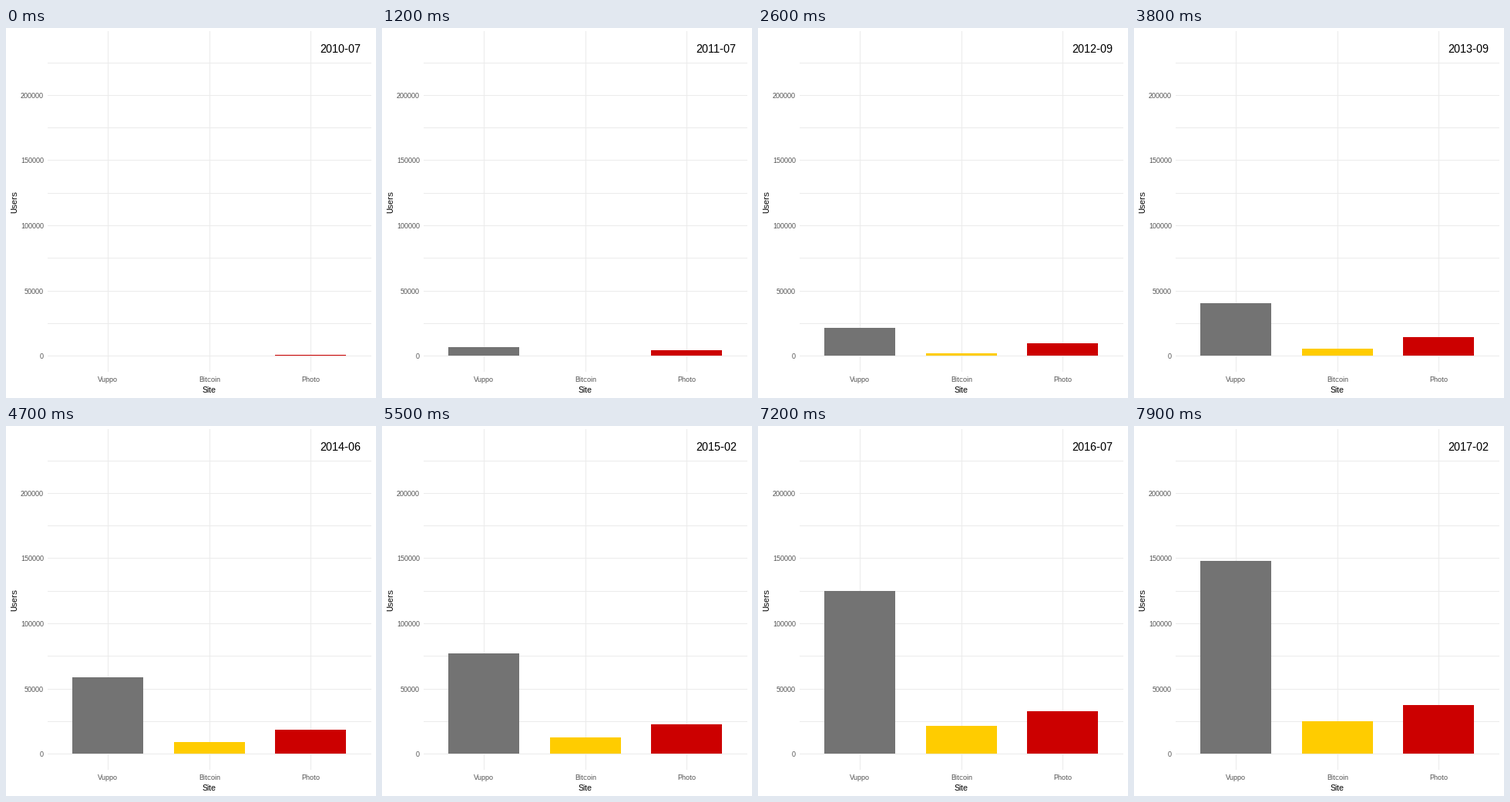
Write a matplotlib script that moves like this. It is 480 px wide and 480 px high and loops after 8 s.

```python
import matplotlib.pyplot as plt
from matplotlib.animation import FuncAnimation

SIZE, DPI = 480, 100
FRAMES, INTERVAL = 80, 100
ZERO_Y, PX_PER_USER = 425.5, 84.5 / 50000
BASE, BAR_WIDTH = 425, 92
GRID, TICK = "#ebebeb", "#4d4d4d"

plt.rcParams.update({
    "font.family": "Liberation Sans",
    "text.hinting": "native",
    "text.hinting_factor": 1,
})
fig = plt.figure(figsize=(SIZE / DPI, SIZE / DPI), dpi=DPI, facecolor="white")
ax = fig.add_axes([0, 0, 1, 1])
ax.set(xlim=(0, SIZE), ylim=(SIZE, 0))
ax.axis("off")


def growth(launch, start, rate, accel, bend=0):
    """Users per month number: a start value plus an ever faster gain."""
    def users(month):
        t = month - launch
        return start + t * (rate + accel * t + bend * t * t) if t >= 0 else 0
    return users


SITES = [
    ("Vuppo", "#737373", growth(0, 0, 333, 19.5)),
    ("Bitcoin", "#ffcc00", growth(13, 0, 80, 7, -0.037)),
    ("Photo", "#cc0000", growth(0, 800, 270, 2.45)),
]


def pt(px):
    return px * 72 / DPI


def label(x, y, text, px, color="black", ha="center", va="baseline", **kw):
    return ax.text(x, y, text, fontsize=pt(px), color=color, ha=ha, va=va, **kw)


def grid_line(xs, ys):
    ax.plot(xs, ys, color=GRID, lw=pt(1), solid_capstyle="butt",
            snap=False, zorder=1)


def height_to_y(users):
    return ZERO_Y - users * PX_PER_USER


for users in range(0, 225001, 25000):
    row = int(height_to_y(users))
    grid_line([54, 474], [row + 0.5] * 2)
    if users % 50000 == 0:
        label(49, row + 4, str(users), 9, TICK, ha="right")

bars = []
for i, (name, color, _) in enumerate(SITES):
    mid = round(132 + 131.5 * i)
    grid_line([mid + 0.5] * 2, [4, 446])
    label(mid, 459, name, 9, TICK)
    bars += ax.bar(mid, 0, BAR_WIDTH, bottom=BASE, color=color,
                   linewidth=0, antialiased=False, zorder=2)

label(264, 473, "Site", 11)
label(16.4, 225.5, "Users", 11, ha="right", va="center", rotation=90)
date = label(407.5, 32, "", 15, ha="left")


def update(month):
    for bar, (_, _, users) in zip(bars, SITES):
        top = min(round(height_to_y(users(month))), BASE)
        bar.set_y(top)
        bar.set_height(BASE - top)
    year, m = divmod(month + 6, 12)
    date.set_text(f"{2010 + year}-{m + 1:02d}")
    return [*bars, date]


anim = FuncAnimation(fig, update, frames=FRAMES, interval=INTERVAL,
                     repeat=True, repeat_delay=0)
plt.show()
```
